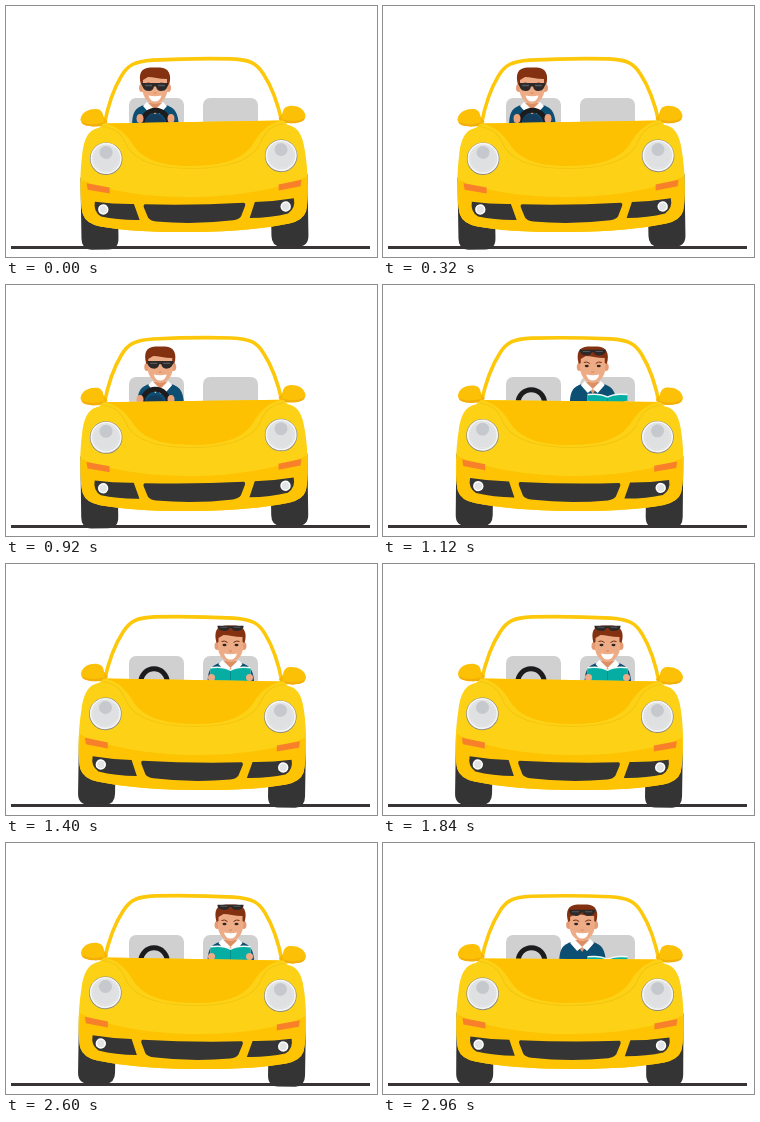
Write an HTML page that moves like this. It is 371x251 px and loops after 3 s.

```html
<!DOCTYPE html>
<html lang="en">
<head>
<meta charset="utf-8">
<title>Car ride</title>
<style>
  html, body { margin: 0; width: 100%; height: 100%; overflow: hidden; background: #fff; }
  svg { display: block; width: 100%; height: 100%; }
</style>
</head>
<body>
<svg viewBox="0 0 371 251">
  <defs>
    <clipPath id="cabin"><path d="M97 40H278V122H97z"/></clipPath>

    <path id="wheel" d="M74 170H111V231Q111 242 101 242H84Q74 242 74 231z" fill="#343434"/>

    <g id="mirror">
      <path d="M96 107L102 114L99 119L92 118z" fill="#f8b404"/>
      <path d="M75 111.500C76 104 84 101 91 101.500C97 102 98 107 98.500 113C98 117 95 118.500 89 118.500C81 118.500 75 116.500 75 111.500z" fill="#fcc006"/>
      <path d="M76 114C82 117.500 91 117 98 115C97 118.500 94 119 88 119C81 118.500 76 117 76 114z" fill="#f3ae08"/>
    </g>

    <g id="lamps">
      <circle cx="100" cy="151.300" r="16.300" fill="#8f8c80"/>
      <circle cx="100" cy="151" r="15.600" fill="#f5f5f5"/>
      <circle cx="100" cy="151" r="14" fill="#dfe0e2"/>
      <circle cx="100" cy="151" r="12.500" fill="none" stroke="#ededee" stroke-dasharray="1 2"/>
      <circle cx="100" cy="145" r="6.500" fill="#c5c8cc"/>
      <path d="M80 175.500L103 180V186L81 182z" fill="#f8802b"/>
      <path d="M88 194Q108 197 127 197L132.500 213Q111 213 94 209Q86 204 88 194z" fill="#353535"/>
      <circle cx="96.300" cy="202" r="5.200" fill="#fff"/>
      <circle cx="96.300" cy="202" r="3.700" fill="#e3e4e5"/>
    </g>
  </defs>

  <path d="M5 241.500H364" stroke="#383436" stroke-width="2.800"/>

  <g fill="#d0d0d0">
    <rect x="123" y="92" width="55" height="30" rx="7"/>
    <rect x="197" y="92" width="55" height="30" rx="7"/>
  </g>

  <g clip-path="url(#cabin)">
    <g id="driver">
      <path d="M-23 122C-23 105 -20 101 -7 98H7C20 101 23 105 24 122z" fill="#0d4e73"/>
      <path d="M-8 97L0 109L8 97z" fill="#e0966f"/>
      <path d="M-8 96L-12 100L-5 108L0 104L5 108L12 100L8 96L0 104z" fill="#fff"/>
      <path d="M-5 90H5V98L0 103L-5 98z" fill="#dc8f64"/>
      <g fill="#e59c74">
        <ellipse cx="-13" cy="82" rx="3" ry="4"/>
        <ellipse cx="13" cy="82" rx="3" ry="4"/>
      </g>
      <path d="M-12.500 71H12.500V84C12 92 6 98 0 98C-6 98 -12 92 -12.500 84z" fill="#eeac86"/>
      <path d="M-14 79C-17 68 -14 62 -5 61.500H5C14 62 17 69 14 79L12 78V73C4 73 -2 71 -7 71L-12 74V78z" fill="#833111"/>
      <g fill="#302522">
        <path d="M-9 77.500Q-6 76 -3 78.500" fill="none" stroke="#733018"/>
        <path d="M3 78.500Q6 76 9 77.500" fill="none" stroke="#733018"/>
        <ellipse cx="-6" cy="81" rx="2" ry="1.200"/>
        <ellipse cx="6" cy="81" rx="2" ry="1.200"/>
      </g>
      <path d="M-1.500 87H1.500" stroke="#d08660"/>
      <path d="M-6.500 89.500Q0 91 6.500 89.500Q5 95.500 0 95.500Q-5 95.500 -6.500 89.500z" fill="#fff"/>
      <g id="glasses">
        <path d="M-13 -3.500H13V-1L11.500 2Q10 4.500 6 4.500Q2 4.500 1 0H-1Q-2 4.500 -6 4.500Q-10 4.500 -11.500 2L-13 -1z" fill="#2d2929"/>
        <path d="M-10 -1H-3M3 -1H10" stroke="#55575a" stroke-width="1.500"/>
      </g>
    </g>

    <circle id="steering" cx="148" cy="118" r="13.200" fill="none" stroke="#1c1b1d" stroke-width="5"/>

    <g id="grip">
      <circle cy="118" r="10" fill="#153d5b"/>
      <g fill="#eca37a">
        <ellipse cx="-15" cy="112.500" rx="3.500" ry="4.500"/>
        <ellipse cx="16" cy="112.500" rx="3.500" ry="4.500"/>
      </g>
    </g>

    <g id="book">
      <path d="M-20 103Q-7 101.500 0 105.500Q7 101.500 20 103V121H-20z" fill="#f4fafa"/>
      <path d="M-20 104.500Q-7 103 0 107Q7 103 20 104.500V121H-20z" fill="#06ada2"/>
      <path d="M0 107V121" stroke="#078f8c"/>
      <g fill="#eeac86">
        <ellipse cx="-19" cy="113.500" rx="3.500" ry="3.500"/>
        <ellipse cx="19" cy="113.500" rx="3.500" ry="3.500"/>
      </g>
    </g>
  </g>

  <g id="car">
    <use href="#wheel"/>
    <use href="#wheel" transform="translate(375 0) scale(-1 1)"/>
    <path d="M98.500 118C102 101 107 84 116.500 69C123 58 130 54.500 148 53.500Q187.500 52 227 53.500C245 54.500 252 58 258.500 69C268 84 273 101 276.500 118" fill="none" stroke="#fdc70a" stroke-width="3.600"/>
    <use href="#mirror"/>
    <use href="#mirror" transform="translate(375 0) scale(-1 1)"/>
    <path d="M98 116H278L282 120.500C291 122 297 129 299 148C302 168 302 196 299 207Q296 216 282 219Q245 226 187.500 226Q130 226 93 219Q79 216 76 207C73 196 73 168 76 148C78 129 84 122 93 120.500z" fill="#fcd116"/>
    <path d="M75 172C98 183 140 191 187.500 191C235 191 277 183 300 172C301 186 301 200 299 207Q296 216 282 219Q245 226 187.500 226Q130 226 93 219Q79 216 76 207C74 200 74 186 75 172z" fill="#fec404"/>
    <path d="M97 119C112 121 117 129 122 141C132 156 155 162.500 187.500 162.500C220 162.500 243 156 253 141C258 129 263 121 278 119" fill="none" stroke="#f5c50f"/>
    <path d="M100 116H275C262 120 255 126 247 139C236 155 215 160 187.500 160C160 160 139 155 128 139C120 126 113 120 100 116z" fill="#fec102"/>
    <use href="#lamps"/>
    <use href="#lamps" transform="translate(375 0) scale(-1 1)"/>
    <path d="M138 197.500Q187.500 199.500 237 197.500Q239 198 238 201L234 211Q232 214 226 215Q187.500 219 149 215Q143 214 141 211L137 201Q136 198 138 197.500z" fill="#353535"/>
  </g>
</svg>
<script>
  const LOOP = 3000, MOVE = 360, SLIDE_OUT = 863, SLIDE_BACK = 2821;
  const part = id => document.getElementById(id);
  const [driver, glasses, steering, grip, book, car] =
    ['driver', 'glasses', 'steering', 'grip', 'book', 'car'].map(part);

  const ease = u => {
    u = Math.min(1, Math.max(0, u));
    return u * u * (3 - 2 * u);
  };
  const mix = (a, b, p) => a + (b - a) * p;
  const move = (el, x, y, sy = 1) =>
    el.setAttribute('transform', `translate(${x} ${y}) scale(1 ${sy})`);

  // p is 0 in the driving seat and 1 in the passenger seat.
  function draw(t) {
    const p = ease((t - SLIDE_OUT) / MOVE) - ease((t - SLIDE_BACK) / MOVE);
    move(driver, mix(149, 224.5, p), 0);
    move(glasses, 0, mix(80.5, 64, p), mix(1, 0.65, p));
    move(steering, mix(1.5, 0, p), mix(-0.5, 0, p));
    move(grip, 149, p * 30);
    move(book, 224.5, (1 - p) * 30);
    car.setAttribute('transform',
      `translate(${-0.5 * p} 0) rotate(${mix(-0.94, 0.94, p)} 187.5 142)`);
  }

  function tick() {
    draw(performance.now() % LOOP);
    requestAnimationFrame(tick);
  }
  tick();
</script>
</body>
</html>
```
